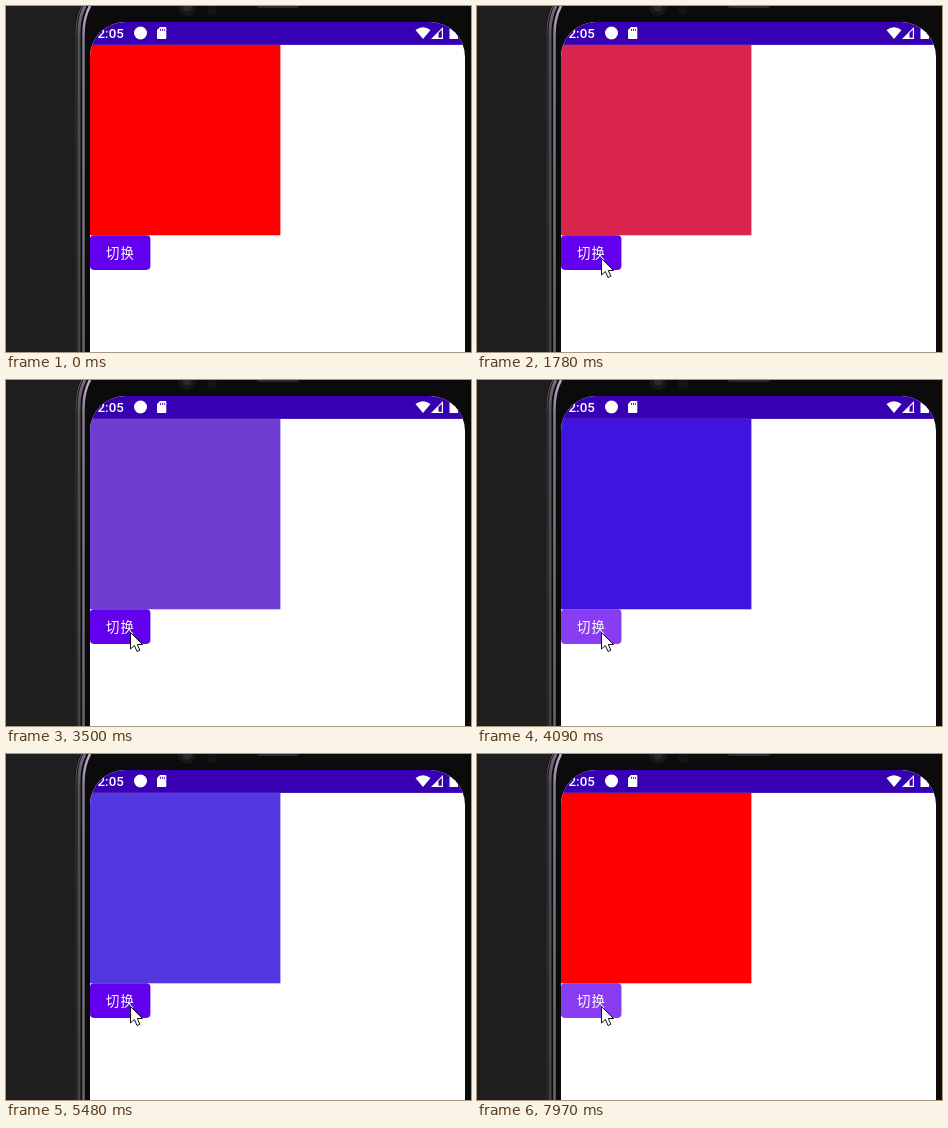
These frames come from a looping animation (465x346 px, 8 s). An HTML page:

```html
<!DOCTYPE html>
<html lang="zh">
<head>
<meta charset="utf-8">
<style>
html, body { margin: 0; width: 100%; height: 100%; overflow: hidden; background: #1e1e1e; }
svg { display: block; }
</style>
</head>
<body>
<svg width="465" height="346" viewBox="0 0 465 346">
  <defs>
    <clipPath id="screen"><path d="M84 346V51A35 35 0 0 1 119 16H424A35 35 0 0 1 459 51V346Z"/></clipPath>
    <clipPath id="buttonClip"><rect x="84" y="229.3" width="60.4" height="34.6" rx="3.8"/></clipPath>
    <linearGradient id="metal" x1="0" y1="0" x2="0" y2="346" gradientUnits="userSpaceOnUse">
      <stop offset="0" stop-color="#c4aecb"/>
      <stop offset=".1" stop-color="#857d8a"/>
      <stop offset="1" stop-color="#68666b"/>
    </linearGradient>
  </defs>
  <rect width="465" height="346" fill="#1e1e1e"/>
  <path d="M0 342.5H69" stroke="#292222"/>
  <path d="M69 346V26Q69 10 75 0H465V346Z" fill="#0b0b0c"/>
  <g fill="none" stroke="url(#metal)">
    <path d="M70 346V26Q70 11 76 0" stroke-width="1" opacity=".55"/>
    <path d="M73 346V26Q73 11 79 0" stroke-width="3" opacity=".6"/>
    <path d="M77.500 346V28Q77.500 12 84 0" stroke-width="2.500"/>
  </g>
  <circle cx="181" cy="1" r="9" fill="#171719"/>
  <circle cx="181" cy="1" r="4.5" fill="#29292d"/>
  <circle cx="206" cy="4" r="5" fill="#141416"/>
  <rect x="251" y="-4" width="42" height="6" rx="2" fill="#29292b"/>
  <g clip-path="url(#screen)">
    <rect x="84" y="16" width="375" height="330" fill="#fff"/>
    <rect x="84" y="16" width="375" height="22.9" fill="#3700b3"/>
    <g fill="#fff">
      <text x="84" y="32" font-family="Roboto, sans-serif" font-size="13.3" font-weight="500">12:05</text>
      <circle cx="134.5" cy="27" r="6.5"/>
      <path d="M154 21H159.3Q160.3 21 160.3 22V32Q160.3 33 159.3 33H152Q151 33 151 32V24Z"/>
      <path d="M409.5 24Q417 18.5 424.5 24L417 33Z"/>
      <path d="M437 21V33H425Z"/>
      <path d="M443.5 22.5H446V21H450V22.5H452V33H443.5Z"/>
    </g>
    <path d="M154.5 22.8V25M156.5 22.8V25M158.4 22.8V25" stroke="#3700b3" stroke-width=".8"/>
    <path d="M432.500 27L435.800 23.700V31.800H432.500Z" fill="#3700b3"/>
    <rect id="square" x="84" y="38.9" width="190.4" height="190.4" fill="#f00"/>
    <g clip-path="url(#buttonClip)">
      <rect x="84" y="229" width="61" height="36" fill="#6200ee"/>
      <circle id="ripple" fill="#fff"/>
    </g>
    <text x="100" y="252" fill="#fff" font-family="'Noto Sans CJK SC', 'Noto Sans CJK', sans-serif" font-size="13.4" letter-spacing="1.1">切换</text>
  </g>
  <path id="cursor" d="M0 0V16.5L3.9 13L6.5 19L9.3 17.8L6.8 12H12Z" fill="#fff" stroke="#111" stroke-width="1"/>
</svg>
<script>
const LOOP = 8000, FADE = 1000;
const byId = id => document.getElementById(id);
const mix = (a, b, k) => a + (b - a) * k;

// Press and release times of the button
const clicks = [[1270, 1560], [2230, 2440], [3000, 3090], [3910, 4090],
  [4760, 4930], [6060, 6270], [7560, 8100]];

// Position along the fade, then red, green, blue
const colors = [[0, 255, 0, 0], [.02, 250, 0, 20], [.17, 218, 36, 77],
  [.67, 108, 62, 210], [.83, 86, 58, 226], [.88, 76, 34, 214], [1, 62, 20, 222]];

// Time, x, y of the pointer tip
const moves = [[20, 361, 338], [70, 310, 320], [130, 275, 304], [320, 272, 302],
  [460, 270, 301], [750, 165, 266], [1000, 113, 242], [1210, 124.5, 252.5]];

function sample(keys, t) {
  const i = keys.findIndex(key => key[0] >= t);
  if (i < 0) return keys[keys.length - 1].slice(1);
  if (i === 0) return keys[0].slice(1);
  const a = keys[i - 1], b = keys[i], k = (t - a[0]) / (b[0] - a[0]);
  return a.slice(1).map((v, n) => mix(v, b[n + 1], k));
}

// cubic-bezier(.4, 0, .2, 1)
function ease(x) {
  if (x >= 1) return 1;
  let lo = 0, hi = 1, s;
  for (let i = 0; i < 20; i++) {
    s = (lo + hi) / 2;
    const at = 1.2 * s * (1 - s) ** 2 + .6 * s * s * (1 - s) + s ** 3;
    if (at < x) lo = s; else hi = s;
  }
  return s * s * (3 - 2 * s);
}

// Each release reverses the fade from wherever it has got to
function fadeLevel(t) {
  let level = 0;
  clicks.forEach(([, start], i) => {
    if (t < start) return;
    const next = clicks[i + 1] ? clicks[i + 1][1] : Infinity;
    level = mix(level, i % 2 ? 0 : 1, ease((Math.min(t, next) - start) / FADE));
  });
  return level;
}

function drawRipple(t) {
  const click = clicks.filter(c => c[0] <= t).pop();
  let alpha = 0, grow = 0;
  if (click) {
    const [press, release] = click;
    const out = (t - Math.max(press + 225, release)) / 150;
    grow = ease((t - press) / 225);
    alpha = .24 * Math.min(1, (t - press) / 75) * Math.min(1, Math.max(0, 1 - out));
  }
  const ripple = byId("ripple");
  ripple.setAttribute("cx", mix(125, 114.2, grow));
  ripple.setAttribute("cy", mix(253, 246.6, grow));
  ripple.setAttribute("r", mix(10, 38, grow));
  ripple.setAttribute("opacity", alpha);
}

function draw(t) {
  const rgb = sample(colors, fadeLevel(t)).map(Math.round);
  byId("square").setAttribute("fill", `rgb(${rgb})`);
  drawRipple(t);
  const cursor = byId("cursor");
  cursor.setAttribute("visibility", t < 20 ? "hidden" : "visible");
  cursor.setAttribute("transform", `translate(${sample(moves, t)})`);
}

const begin = performance.now();
function tick() {
  draw((performance.now() - begin) % LOOP);
  requestAnimationFrame(tick);
}
tick();
</script>
</body>
</html>
```
